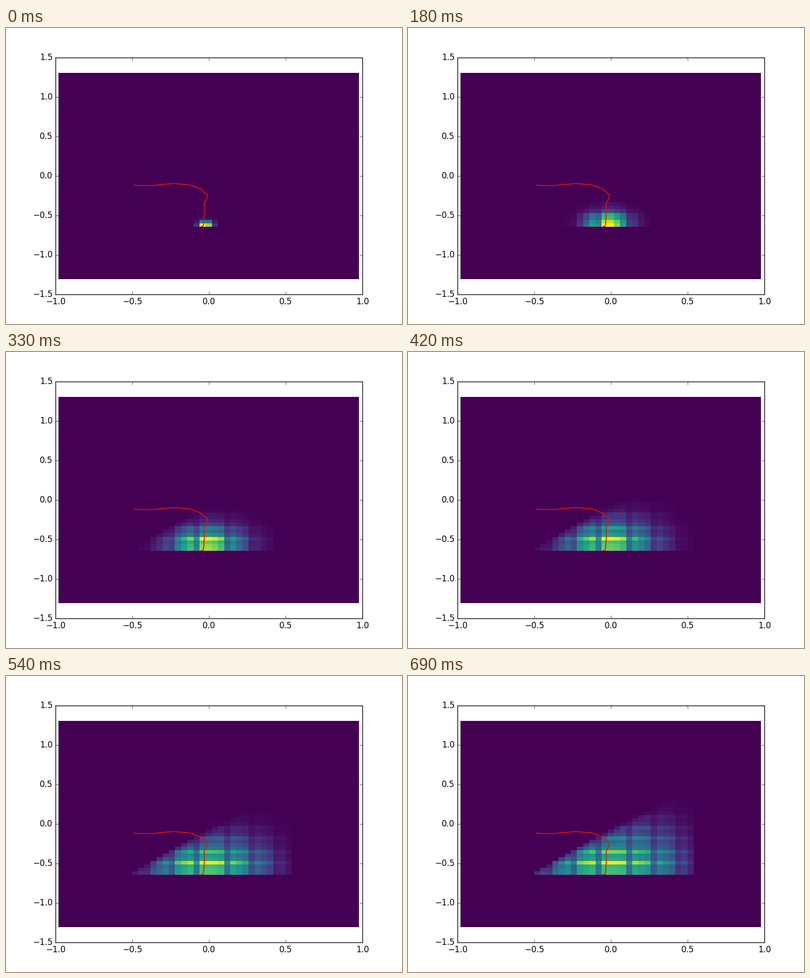
A matplotlib script for the animation above (720 ms loop, 800 by 600 pixels).

```python
import numpy as np
import matplotlib.pyplot as plt
from matplotlib.animation import FuncAnimation

FRAMES, INTERVAL = 24, 30
NX, NY = 49, 59            # bins of the whole histogram
COL0, ROW0 = 12, 15        # lower left bin of the occupied region
SIZE = 26                  # columns and rows of that region

plt.rcParams.update({
    "font.family": "DejaVu Sans",
    "font.size": 12,
    "text.hinting": "auto",
    "text.hinting_factor": 8,
    "text.kerning_factor": 6,
    "axes.linewidth": 1.0,
    "xtick.alignment": "center",
    "ytick.alignment": "center",
})

TRACK = np.array([
    (-.487, -.115), (-.457, -.121), (-.370, -.121), (-.312, -.108),
    (-.228, -.096), (-.128, -.111), (-.057, -.161), (-.031, -.208),
    (-.009, -.234), (-.015, -.290), (-.031, -.341), (-.030, -.472),
    (-.036, -.622), (-.041, -.640), (-.051, -.640)])


def beat(i, start, period):
    """True where bin i holds one of the points start + k * period."""
    return np.floor((i + 1 - start) / period) > np.floor((i - start) / period)


def fade(gap):
    """Soft border: zero outside, then halving the distance to 1 per bin."""
    return 1 - 0.5 ** np.maximum(gap, 0)


ROW, COL = np.mgrid[:SIZE, :SIZE]
# Uneven binning makes some columns fainter and some rows brighter.
WEIGHT = (np.where(beat(COL, 2.3, 4.25), 0.58, 1)
          * np.where(beat(ROW, 0, 3.4), 1, 0.65)
          * fade(COL + 1 - 1.05 * ROW) * fade(SIZE - COL))


def density(n):
    """Spreading Gaussian cut to a triangle, peak scaled to 1."""
    var = 0.6 + 0.128 * n ** 2
    center = 11.4 + 0.018 * n
    part = WEIGHT * np.exp(-((COL - center) ** 2 + ROW ** 2) / (2 * var))
    grid = np.zeros((NY, NX))
    grid[ROW0:ROW0 + SIZE, COL0:COL0 + SIZE] = part / part.max()
    return grid


fig = plt.figure(figsize=(8, 6), dpi=100, facecolor="white")
ax = fig.add_axes([0.125, 0.1, 0.775, 0.8])
mesh = ax.pcolormesh(
    np.linspace(-0.981, 0.979, NX + 1), np.linspace(-1.309, 1.309, NY + 1),
    density(0), cmap="viridis", vmin=0, vmax=1, antialiased=False)
ax.plot(*TRACK.T, color="#e21010", lw=1.3)

ax.set(xlim=(-1, 1), ylim=(-1.5, 1.5),
       xticks=np.arange(-1, 1.1, 0.5), yticks=np.arange(-1.5, 1.6, 0.5))
ax.tick_params(direction="in", length=4, width=0.5, pad=4,
               top=True, right=True)


def update(n):
    mesh.set_array(density(n))
    return [mesh]


anim = FuncAnimation(fig, update, frames=FRAMES, interval=INTERVAL,
                     repeat=True, repeat_delay=0)
plt.show()
```
